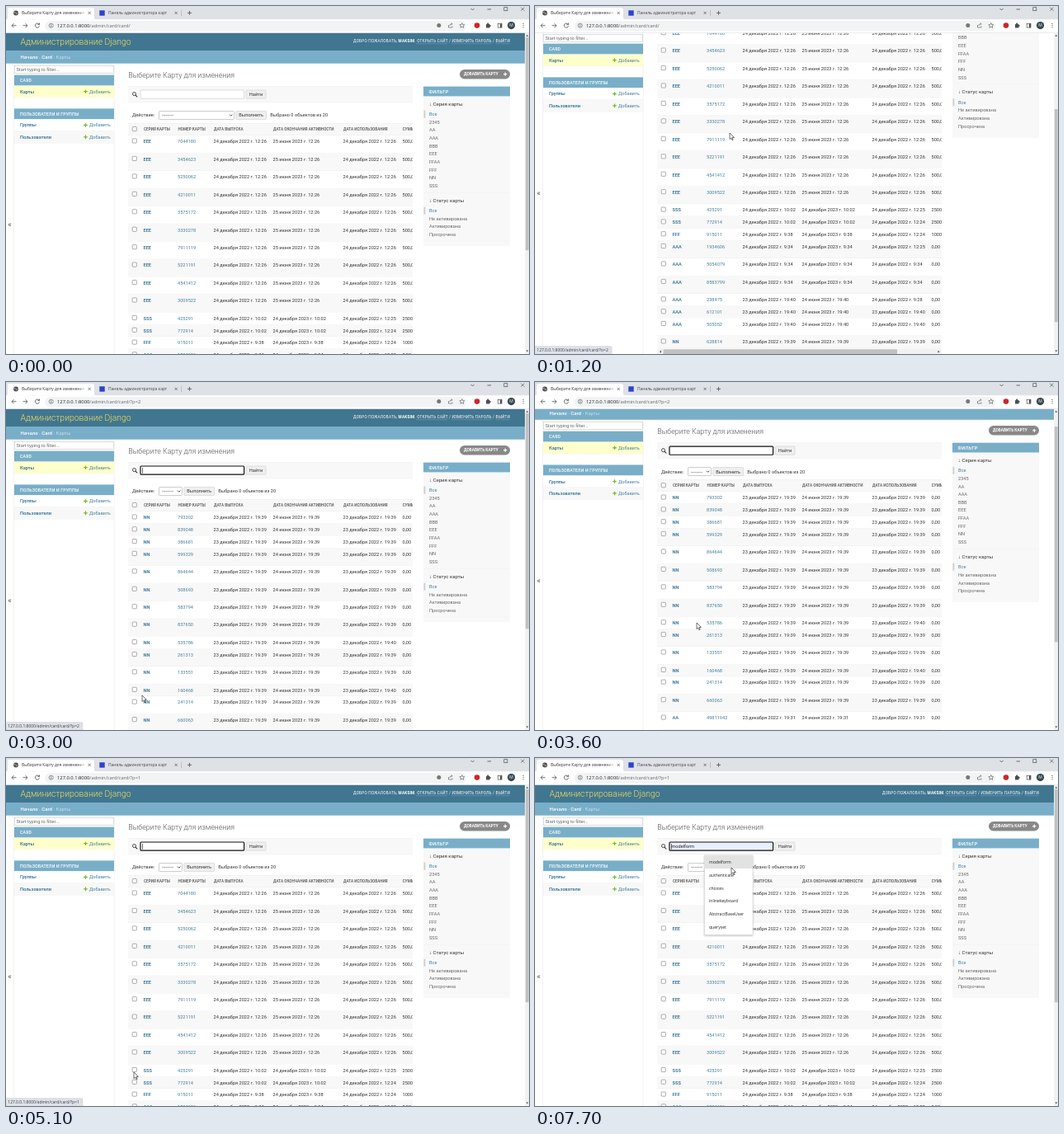
These frames come from a looping animation (634x422 px, 8000 ms). An HTML page:

```html
<!DOCTYPE html>
<html lang="ru">
<head>
<meta charset="utf-8">
<title>Панель администратора карт</title>
<style>
html, body { margin: 0; width: 100%; height: 100%; overflow: hidden; background: #fff; }
svg { display: block; width: 634px; height: 422px; font-family: Roboto, sans-serif; }
.ui { font-family: "Open Sans", "Noto Sans", sans-serif; }
</style>
</head>
<body>
<svg id="stage" viewBox="0 0 634 422"></svg>
<script>
const BLUE = '#79aec8', LINK = '#447e9b', GREY = '#f8f8f8', INK = '#333', ICON = '#4b4f54';
const BOLD = 'font-weight="700"', MEDIUM = 'font-weight="500"';
const TOP = 32.5, VIEW = 389.5, FIRST_ROW = 157;

// Text is placed by its vertical centre.
const text = (x, y, s, size = 5.65, fill = INK, extra = '') =>
  `<text x="${x}" y="${y + size * 0.35}" font-size="${size}" fill="${fill}" ${extra}>${s}</text>`;
const rect = (x, y, w, h, fill, extra = '') =>
  `<rect x="${x}" y="${y}" width="${w}" height="${h}" fill="${fill}" ${extra}/>`;
const circle = (x, y, r, fill, extra = '') =>
  `<circle cx="${x}" cy="${y}" r="${r}" fill="${fill}" ${extra}/>`;
const line = (d, color = ICON, width = 0.8) =>
  `<path d="${d}" fill="none" stroke="${color}" stroke-width="${width}"/>`;
const group = (id, body, extra = '') => `<g id="${id}" ${extra}>${body}</g>`;
const cross = (x, y, r, color = ICON) =>
  line(`M${x - r} ${y - r}l${2 * r} ${2 * r}m0 ${-2 * r}l${-2 * r} ${2 * r}`, color, 0.7);
const plus = (x, y, r, color, width) =>
  line(`M${x - r} ${y}h${2 * r}M${x} ${y - r}v${2 * r}`, color, width);
const button = (x, y, w, label) =>
  rect(x, y, w, 10.2, '#efefef', 'stroke="#c4c4c4" stroke-width=".5" rx="1"') +
  text(x + w / 2, y + 5.1, label, 5.65, INK, 'text-anchor="middle"');
const checkbox = y =>
  rect(153.2, y - 2.8, 5.2, 5.2, '#fff', 'stroke="#777" stroke-width=".6" rx=".8"');

// series, numbers, issue day, issue time, expiry date, last use day and time, tall row, sum
const ROWS = [
  `EEE 7044180,3454623,5250062,4210011,3575172,3330278,7911119,5221191,4541412,3009522 24 12:26 25_июня 24 12:26 1 500,00
SSS 425291 24 10:02 24_декабря 24 12:25 0 2500,00
SSS 772914 24 10:02 24_декабря 24 12:24 0 2500,00
FFF 915011 24 9:38 24_декабря 24 12:24 0 1000,00
AAA 1934606 24 9:34 24_декабря 24 12:25 1 0,00
AAA 5054079,8583799 24 9:34 24_декабря 24 9:34 1 0,00
AAA 238475 23 19:40 24_июня 24 9:28 0 0,00
AAA 612101 23 19:40 24_июня 23 19:40 0 0,00
AAA 505052 23 19:40 24_июня 23 19:40 1 0,00
NN 628814 23 19:39 24_июня 23 19:39 0 0,00`,
  `NN 793302,839048,386681 23 19:39 24_июня 23 19:39 0 0,00
NN 599329,864644,508693,583794,837650 23 19:39 24_июня 23 19:39 1 0,00
NN 535786 23 19:39 24_июня 23 19:40 0 0,00
NN 261313,133551 23 19:39 24_июня 23 19:39 1 0,00
NN 160468 23 19:39 24_июня 23 19:40 0 0,00
NN 241314,660063 23 19:39 24_июня 23 19:39 1 0,00
AA 49811942,49811057,49810326,49810118 23 19:31 24_июня 23 19:31 1 0,00
AA 498104,498093 23 19:31 24_июня 23 19:31 0 0,00`
];

function buildTable(source, current) {
  let y = FIRST_ROW, index = 0, body = '';
  for (const entry of source.split('\n')) {
    const [series, numbers, day, time, expiry, useDay, useTime, tall, sum] = entry.trim().split(' ');
    const height = tall === '1' ? 21.45 : 14.8;
    for (const number of numbers.split(',')) {
      const mid = y + 7.3;
      body += rect(148, y, 345, height, index++ % 2 ? GREY : '#fff') +
        rect(148, y + height - 0.4, 345, 0.4, '#e8e8e8') + checkbox(mid - 0.6) +
        text(166.5, mid, series, 5.65, LINK, BOLD) + text(208, mid, number, 5.65, LINK) +
        text(251.5, mid, `${day} декабря 2022 г. ${time}`) +
        text(323.5, mid, `${expiry.replace('_', ' ')} 2023 г. ${time}`) +
        text(408.5, mid, `${useDay} декабря 2022 г. ${useTime}`) + text(480.5, mid, sum);
      y += height;
    }
  }
  let pager = '', x = 155;
  for (let n = 1; n <= 3; n++) {
    const here = n === current;
    if (!here) pager += rect(x, y + 13.2, 8, 8.4, BLUE, 'rx=".8"');
    pager += text(here ? x + 2 : x + 4, y + 17.4, n, 5.65, here ? INK : '#fff',
      here ? BOLD : 'text-anchor="middle"');
    x += here ? 8 : 10;
  }
  const svg = `<g clip-path="url(#tableClip)">${body}</g>` +
    rect(148, y + 0.8, 345, 7.2, '#f1f1f1') + rect(155.5, y + 1.6, 283.5, 5.6, '#c1c1c1') +
    `<path d="M153 ${y + 2.8}v3.2l-2-1.6zM488.5 ${y + 2.8}v3.2l2-1.6z" fill="#555"/>` + pager +
    text(185, y + 17.4, '58 Карты') + text(214, y + 17.4, 'Показать все', 5.65, LINK) +
    rect(148, y + 27.5, 345, 0.4, '#e8e8e8');
  return { svg, maxScroll: y + 58 - 422 };
}

function actionBar(selectWidth) {
  const end = 185.5 + selectWidth;
  return rect(185.5, 127.5, selectWidth, 10, '#fff', 'stroke="#999" stroke-width=".5" rx="1"') +
    text(189, 132.5, '---------') + line(`M${end - 5.5} 131.6l1.7 1.7 1.7-1.7`, '#222') +
    button(end + 2.2, 127.4, 37, 'Выполнить') + text(end + 43.8, 132.5, 'Выбрано 0 объектов из 20');
}

function pageHeader() {
  return rect(0, 32, 629, 22.2, '#417690') + rect(0, 54, 629, 15.7, BLUE) +
    text(17.5, 43, 'Администрирование Django', 10.4, '#f5dd5d', 'font-weight="300"') +
    text(611, 42.5, `ДОБРО ПОЖАЛОВАТЬ, <tspan ${BOLD}>MAKSIM</tspan>. ОТКРЫТЬ САЙТ / ИЗМЕНИТЬ ПАРОЛЬ / ВЫЙТИ`,
      4.7, '#fff', 'text-anchor="end" letter-spacing=".2"') +
    line('M497 45.7h38M540 45.7h49M593.5 45.7h17.5', '#8fb3c4', 0.4) +
    text(17.5, 61.6, `<tspan ${MEDIUM}>Начало</tspan> · <tspan ${MEDIUM}>Card</tspan> · <tspan fill="#c4dce8">Карты</tspan>`, 6.06, '#fff');
}

function sidebar() {
  const caption = (y, label) => rect(10, y - 6.4, 121, 12.8, BLUE) +
    text(17, y, label, 5.2, '#fff', MEDIUM + ' letter-spacing=".15"');
  const item = (y, label, fill) => rect(10, y - 6.9, 121, 14, fill) +
    rect(10, y + 7, 121, 0.4, '#e8e8e8') + text(17, y, label, 5.65, LINK, BOLD) +
    plus(96.5, y, 2.3, '#70bf2b', 1.3) + text(101, y, 'Добавить', 5.65, LINK);
  return rect(9.3, 69.5, 0.5, 400, '#e2e2e2') + rect(130.8, 69.5, 0.5, 400, '#e2e2e2') +
    text(2.2, 264.6, '«', 9.5, '#555') +
    rect(10.3, 72.5, 120.2, 9, '#fff', 'stroke="#bbb" stroke-width=".5"') +
    text(12.5, 77, 'Start typing to filter...', 5.65, '#666') +
    caption(90, 'CARD') + item(103.7, 'Карты', '#ffffcc') +
    caption(130.8, 'ПОЛЬЗОВАТЕЛИ И ГРУППЫ') +
    item(144.5, 'Группы', '#fff') + item(158.9, 'Пользователи', GREY);
}

function filterPanel() {
  const list = (y, labels) => rect(506.5, y - 4.5, 1.8, 9, '#ccc') + labels.split(',').map((label, i) =>
    text(513, y + i * 9.65, label, 5.65, i ? '#666' : LINK)).join('');
  return rect(506, 98, 105, 193, GREY) + rect(506, 97.6, 105, 11.8, BLUE) +
    text(512.5, 103.6, 'ФИЛЬТР', 5.65, '#fff', MEDIUM + ' letter-spacing=".2"') +
    text(513, 118.5, '↓ Серия карты', 6.06) + list(131.2, 'Все,2345,AA,AAA,BBB,EEE,FFAA,FFF,NN,SSS') +
    rect(506, 226, 105, 0.4, '#eee') +
    text(513, 235.5, '↓ Статус карты', 6.06) + list(248.2, 'Все,Не активирована,Активирована,Просрочена');
}

function contentTop() {
  const heads = [[167, 'СЕРИЯ КАРТЫ'], [208.5, 'НОМЕР КАРТЫ'], [252, 'ДАТА ВЫПУСКА'],
    [324, 'ДАТА ОКОНЧАНИЯ АКТИВНОСТИ'], [409, 'ДАТА ИСПОЛЬЗОВАНИЯ'], [480.8, 'СУММА']];
  return text(148.3, 84, 'Выберите Карту для изменения', 8.8, '#555', 'font-weight="300"') +
    rect(550, 77, 61, 11.4, '#888', 'rx="5.7"') +
    text(555, 82.7, 'ДОБАВИТЬ КАРТУ', 4.75, '#fff', BOLD) + plus(605.2, 82.7, 2.1, '#fff', 1.2) +
    rect(148, 97.5, 345, 19, GREY) + rect(148, 97.3, 345, 0.4, '#e8e8e8') + rect(148, 116.3, 345, 0.4, '#e8e8e8') +
    circle(155.5, 106.6, 2, 'none', 'stroke="#333" stroke-width=".9"') + line('M157 108.1l2.2 2.3', '#333', 1.1) +
    rect(163, 102, 125.6, 10.2, '#fff', 'id="search" rx="1"') +
    text(165.3, 107.1, 'modelform', 5.65, '#222', 'id="preview"') +
    rect(165, 104, 0.6, 6.8, '#111', 'id="caret"') + button(291, 102, 24, 'Найти') +
    text(153, 132.5, 'Действие:') +
    `<g clip-path="url(#tableClip)">${rect(148, 142, 345, 15, GREY)}${rect(148, 142, 345, 0.4, '#e8e8e8')}` +
    `${rect(148, 156.6, 345, 0.4, '#e8e8e8')}${checkbox(149.3)}` +
    heads.map(([x, label]) => text(x, 149.8, label, 4.65, '#666', BOLD)).join('') + '</g>';
}

function browserBar() {
  return rect(0, 0, 634, 16.5, '#dee1e6') +
    '<path d="M0 16.5q2 0 2-2V5q0-3 3-3h99q3 0 3 3v9.5q0 2 2 2z" fill="#fff"/>' +
    rect(0, 16.4, 634, 16.1, '#fff') + rect(0, 32, 634, 0.5, '#d5d7da') +
    circle(12, 8.5, 3, '#4c5157') + line('M9.5 8q2-1 2.5.8t2.5-.8', '#fff', 0.6) +
    text(19, 8.5, 'Выберите Карту для изменения', 4.95, '#333') +
    rect(88, 4, 8, 9, 'url(#fade)') + rect(96, 4, 2, 9, '#fff') + cross(101.2, 8.4, 1.6) +
    rect(113.3, 5.3, 6.4, 6.4, '#3042c8') + text(124, 8.5, 'Панель администратора карт', 4.95, '#444') +
    cross(206.2, 8.4, 1.6) + rect(212.5, 5, 0.5, 7, '#999') + plus(222.5, 8.4, 2.5, ICON, 0.8) +
    line('M563.5 3l2 2 2-2M583.5 4h4.5') +
    rect(603.8, 1.7, 4, 4, 'none', `stroke="${ICON}" stroke-width=".7"`) + cross(626.3, 3.7, 2) +
    rect(47.5, 18, 510.5, 12.6, '#f1f3f4', 'rx="6.3"') +
    line('M12.5 23.7h-5.5m2.6-2.6l-2.6 2.6 2.6 2.6M20.5 23.7h5.5m-2.6-2.6l2.6 2.6-2.6 2.6M40 22a2.6 2.6 0 1 0 .5 2.2M40.5 20.5v2.2h-2.2') +
    circle(54.7, 23.7, 2.5, 'none', `stroke="${ICON}" stroke-width=".6"`) + line('M54.7 22.2v.7m0 .5v1.8') +
    text(62, 23.6, '127.0.0.1:8000<tspan id="path" fill="#5f6368"></tspan>', 5.8, '#202124') +
    circle(524.8, 23.6, 2.5, '#777') + line('M536.5 23v3h4.5v-1.5M537.8 24q0-2.3 3-2.3m-1-1.2l1.3 1.2-1.3 1.2', ICON, 0.6) +
    line('M552.8 20.6l.9 2 2.1.2-1.6 1.4.5 2.1-1.9-1.1-1.9 1.1.5-2.1-1.6-1.4 2.1-.2z', ICON, 0.6) +
    circle(571, 23.6, 3.3, '#d0242b') + rect(582, 22, 4.5, 4.4, ICON, 'rx=".5"') + circle(584.2, 21.6, 1.1, ICON) + circle(586.7, 24, 1.1, ICON) +
    rect(596.2, 21.3, 4.8, 4.8, 'none', `stroke="${ICON}" stroke-width=".7"`) + rect(599, 21.3, 2, 4.8, ICON) +
    circle(612.5, 23.6, 4.6, '#37474f') + text(612.5, 23.6, 'M', 5, '#fff', 'text-anchor="middle"') +
    [21.4, 23.6, 25.8].map(y => circle(627, y, 0.6, ICON)).join('');
}

function suggestions() {
  const words = ['modelform', 'authenticate', 'choices', 'inlinekeyboard', 'AbstractBaseUser', 'queryset'];
  return rect(205.5, 118, 58.5, 96.5, '#fff', 'stroke="#c8c8c8" stroke-width=".5" filter="url(#shadow)"') +
    rect(205.5, 118.2, 58.5, 15.8, '#e2e2e2', 'id="highlight"') +
    words.map((word, i) => text(211, 126.3 + i * 15.75, word, 5.1, '#222')).join('');
}

const tables = ROWS.map((source, i) => buildTable(source, i + 1));
const stage = document.getElementById('stage');
stage.innerHTML = `<defs>
  <clipPath id="tableClip"><rect x="148" y="0" width="345" height="900"/></clipPath>
  <clipPath id="pageClip"><rect x="0" y="${TOP}" width="629.3" height="${VIEW}"/></clipPath>
  <linearGradient id="fade"><stop stop-color="#fff" stop-opacity="0"/><stop offset="1" stop-color="#fff"/></linearGradient>
  <filter id="shadow"><feDropShadow dx="0" dy="1" stdDeviation="1" flood-opacity=".25"/></filter>
</defs>` + rect(0, 0, 634, 422, '#fff') +
  `<g clip-path="url(#pageClip)">` +
  group('scroller', pageHeader() + contentTop() + filterPanel() + group('wide', actionBar(91)) +
    group('narrow', actionBar(28)) + group('table0', tables[0].svg) + group('table1', tables[1].svg)) +
  group('side', sidebar()) + '</g>' +
  rect(629.3, TOP, 4.7, VIEW, '#f1f1f1') + rect(629.8, 38, 3.9, 250, '#c1c1c1', 'id="thumb"') +
  '<path d="M630.3 36.8h3l-1.5-2zM630.3 417.5h3l-1.5 2z" fill="#555"/>' +
  group('list', suggestions(), 'class="ui"') + group('chrome', browserBar(), 'class="ui"') +
  group('status', rect(-2, 412.6, 95, 12, '#dee1e6', 'rx="1.5" stroke="#c4c7cb" stroke-width=".4"') +
    text(2.3, 417.4, '', 4.97, '#3c4043', 'id="statusText"'), 'class="ui"') +
  group('cursor',
    '<path id="arrow" d="M0 0v7.6l1.8-1.6 1.2 2.7 1.2-.5-1.2-2.7h2.4z" fill="#fff" stroke="#111" stroke-width=".6"/>' +
    '<path id="hand" d="M-.7 .5q.7-1 1.4 0v3l3 .8q.8.3.6 1.2l-.6 3.2h-4l-2.5-3.4q.6-1 2.1.4z" fill="#fff" stroke="#111" stroke-width=".6"/>' +
    '<path id="beam" d="M-1.5-3.5q1.5 0 1.5 1v5q0 1 1.5 1M1.5-3.5q-1.5 0-1.5 1v5q0 1-1.5 1" fill="none" stroke="#222" stroke-width=".6"/>');

const el = {};
stage.querySelectorAll('[id]').forEach(node => el[node.id] = node);

const show = (id, on) => el[id].setAttribute('visibility', on ? 'inherit' : 'hidden');
const move = (id, x, y) => el[id].setAttribute('transform', `translate(${x} ${y})`);
const within = (t, a, b) => t >= a && t < b;

function sample(keys, t) {
  const i = keys.findIndex(key => key[0] > t);
  if (i < 0) return keys[keys.length - 1].slice(1);
  if (i === 0) return keys[0].slice(1);
  const a = keys[i - 1], b = keys[i], k = (t - a[0]) / (b[0] - a[0]);
  return a.slice(1).map((v, j) => v + (b[j + 1] - v) * k);
}

const LOOP = 8000, PAGE_TWO = 2850, PAGE_ONE = 4800, LIST_OPEN = 6700, LIST_HOVER = 7100;
const SCROLLS = [
  [[1000, 0], [1100, 58], [1200, 131], [1300, 166], [1400, 182]],
  [[3500, 0], [3600, 23.4], [3700, 76], [3850, 140], [4000, 180]],
];
const POINTER = [[250, 300, 424], [600, 262, 250], [900, 236, 152], [1000, 236, 154], [1700, 236, 154],
  [1800, 238, 166], [2100, 208.5, 343], [2400, 167, 379], [3000, 165, 380], [3300, 172, 355],
  [3600, 196, 292], [3950, 202, 288], [4400, 157, 380], [5100, 155, 381], [5400, 155, 381],
  [5800, 326, 250], [6100, 285, 160], [6300, 247, 128], [6500, 205, 107], [6950, 205, 107], [7500, 238, 133]];
const STATUSES = [[950, 1500, '?o=2'], [2350, 3250, '?p=2'], [4550, 5600, '?p=1']];
const CARET_RESETS = [PAGE_TWO, PAGE_ONE, 6300, LIST_OPEN];

function draw(t) {
  const second = within(t, PAGE_TWO, PAGE_ONE), focused = t >= PAGE_TWO;
  const { maxScroll } = tables[+second];
  const scroll = t >= PAGE_ONE ? 0 : Math.min(maxScroll, sample(SCROLLS[+second], t)[0]);
  move('scroller', 0, -scroll);
  move('side', 0, -Math.min(scroll, 38));
  show('table0', !second);
  show('table1', second);
  show('wide', !focused);
  show('narrow', focused);

  const ratio = 379 / (VIEW + maxScroll);
  el.thumb.setAttribute('y', 38 + scroll * ratio);
  el.thumb.setAttribute('height', VIEW * ratio);

  const previewing = t >= LIST_HOVER;
  el.search.setAttribute('stroke', focused ? '#101010' : '#bbb');
  el.search.setAttribute('stroke-width', focused ? 1.2 : 0.5);
  el.search.setAttribute('fill', previewing ? '#e8f0fe' : '#fff');
  show('preview', previewing);
  show('highlight', previewing);
  show('list', t >= LIST_OPEN);
  const reset = CARET_RESETS.filter(time => time <= t).pop();
  show('caret', focused && (t - reset) % 1000 < 500);

  const base = '/admin/card/card/';
  el.path.textContent = base + (second ? '?p=2' : focused ? '?p=1' : '');
  const status = STATUSES.find(([from, to]) => within(t, from, to));
  show('status', status);
  if (status) el.statusText.textContent = '127.0.0.1:8000' + base + status[2];

  const hand = within(t, 2400, PAGE_TWO) || within(t, 4400, PAGE_ONE);
  const beam = within(t, 6400, 7050);
  move('cursor', ...sample(POINTER, t));
  show('cursor', t >= 250);
  show('arrow', !hand && !beam);
  show('hand', hand);
  show('beam', beam);
}

const start = performance.now();
function frame() {
  draw((performance.now() - start) % LOOP);
  requestAnimationFrame(frame);
}
frame();
</script>
</body>
</html>
```
